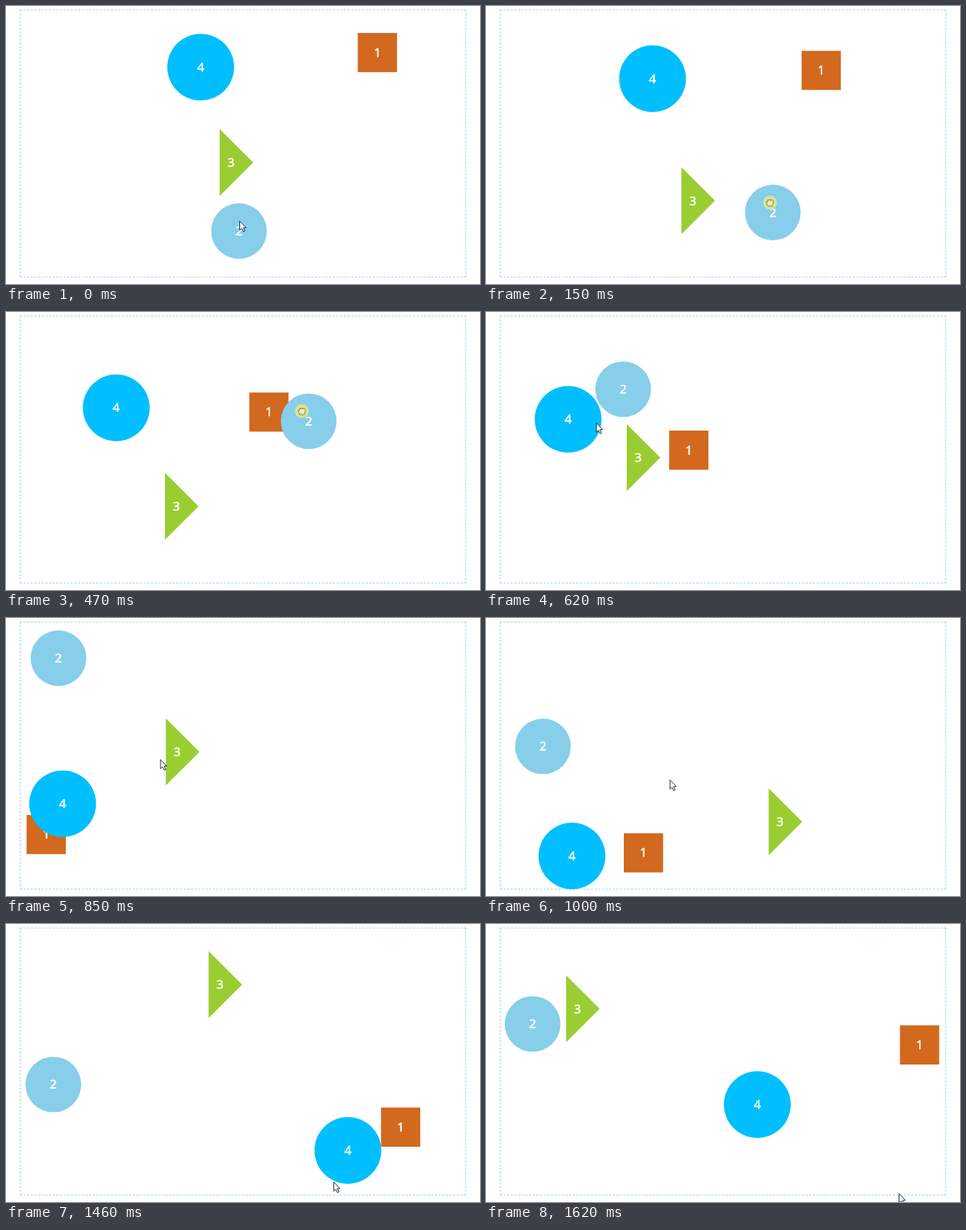
An HTML page that plays this animation: 650x382 px, repeating every 1690 ms.

```html
<!DOCTYPE html>
<html lang="en">
<head>
<meta charset="utf-8">
<title>Bouncing shapes</title>
<style>
  html, body { margin: 0; width: 100%; height: 100%; overflow: hidden; background: #fff; }
  .stage { position: absolute; left: 19px; top: 5px; width: 612px; height: 368px;
    box-sizing: border-box; border: 1px dashed #9fd8ef; }
  svg { position: absolute; left: 0; top: 0; width: 650px; height: 382px; }
  text { font: 17px "Noto Sans", "Open Sans", sans-serif; text-anchor: middle;
    fill: #fff; stroke: #fff; stroke-width: .5px; }
</style>
</head>
<body>
<div class="stage"></div>
<svg viewBox="0 0 650 382">
  <g id="square">
    <rect x="-26.9" y="-26.9" width="53.8" height="53.8" fill="#d2691e"/>
    <text y="5.8">1</text>
  </g>
  <g id="small">
    <circle r="38.2" fill="#87ceeb"/>
    <text y="5.8">2</text>
  </g>
  <g id="triangle">
    <path d="M0-46 46 0 0 46z" fill="#9acd32"/>
    <text x="15.5" y="6">3</text>
  </g>
  <g id="large">
    <circle r="45.8" fill="#00bfff"/>
    <text y="5.8">4</text>
  </g>
  <g id="cursor">
    <path id="arrow" d="M-.5-.5V12.200L2.400 9.500 4.600 14.200 6.600 13.200 4.500 8.700H8.200z" fill="#fff" stroke="#1d2b3a"/>
    <g id="hand">
      <circle r="9.6" fill="#d3e3a0"/>
      <path d="M-3 5-5 0q0-1.500 1.500-.5V-3q1-1.500 2 0 .8-2 2 0 1-1.500 2 0 1.500-1 2 .5V1L3 5z" fill="#f3e9b4" stroke="#7a8a2c"/>
      <path d="M-3.500-3q1-1.500 2 0 .8-2 2 0 1-1.500 2 0" fill="none" stroke="#c8643a"/>
    </g>
  </g>
</svg>
<script>
const $ = id => document.getElementById(id);
const LOOP = 1690, TICK = 7.7;
const STAGE = { left: 19, top: 5, right: 631, bottom: 373 };

// Walls for a body reaching l, r to its sides and v up and down.
const walls = (l, r, v) => [
  [STAGE.left + l, STAGE.right - r],
  [STAGE.top + v, STAGE.bottom - v]
];
const open = [[-Infinity, Infinity], [-Infinity, Infinity]];

// Each kick is [tick, vx, vy]; between kicks a body coasts and bounces off its walls.
const bodies = {
  square: {
    start: [509.3, 64], bounds: walls(27, 27, 27),
    kicks: [[0, -24.8, 12.25], [7.3, -71.7, 52], [8, -80.4, 35.9],
      [13, 77.1, -7.2], [16, 73.2, -7.3], [19, 26.7, -56.5]]
  },
  small: {
    start: [319.5, 309.3], bounds: walls(38, 38, 38),
    kicks: [[0, 36.9, -12.8], [4, -26, -54], [7, -201, 10],
      [8, -40.2, -22.5], [10.8, -18, 60.6], [14.23, -7.4, 41.6]]
  },
  triangle: {
    start: [293, 215], bounds: walls(0, 46, 46),
    kicks: [[0, -12.5, 26.25], [4, -12.5, 33.5], [8, -29, -32],
      [10, 84.2, 48], [16, -84, -48.9]]
  },
  large: {
    start: [267, 84], bounds: walls(46, 46, 46),
    kicks: [[0, -19.3, 7.94], [8, -20.1, 35.9], [13, 41, -19.5],
      [14.23, 63, 1.7], [19, -48.4, -31.5]]
  },
  cursor: {
    start: [321, 296], bounds: open,
    kicks: [[0, 34.2, -13], [4, -26, -54], [7, -228, 71], [8, 20.2, 14],
      [13, 52, 47.7], [16, 13.7, -3.7], [19, 58.5, 8]]
  }
};

const bounce = (p, [lo, hi]) => p < lo ? 2 * lo - p : p > hi ? 2 * hi - p : p;

function position({ start, bounds, kicks }, tick) {
  return kicks.reduce((pos, [from, ...v], i) => {
    const until = Math.min(tick, kicks[i + 1]?.[0] ?? tick);
    const span = Math.max(0, until - from);
    return pos.map((p, axis) => bounce(p + v[axis] * span, bounds[axis]));
  }, start);
}

// The picture advances in whole ticks, whose starts fall on hundredths of a second.
function tickAt(ms) {
  return Math.floor((Math.floor(ms / 10) + 0.55) / TICK);
}

function draw(ms) {
  const tick = tickAt(ms);
  const dragging = tick > 0 && tick < 7;
  for (const id in bodies)
    $(id).setAttribute("transform", `translate(${position(bodies[id], tick)})`);
  $("hand").style.display = dragging ? "" : "none";
  $("arrow").style.display = dragging ? "none" : "";
}

let begin;
function loop(now) {
  begin ??= now;
  draw((now - begin) % LOOP);
  requestAnimationFrame(loop);
}
draw(0);
requestAnimationFrame(loop);
</script>
</body>
</html>
```
